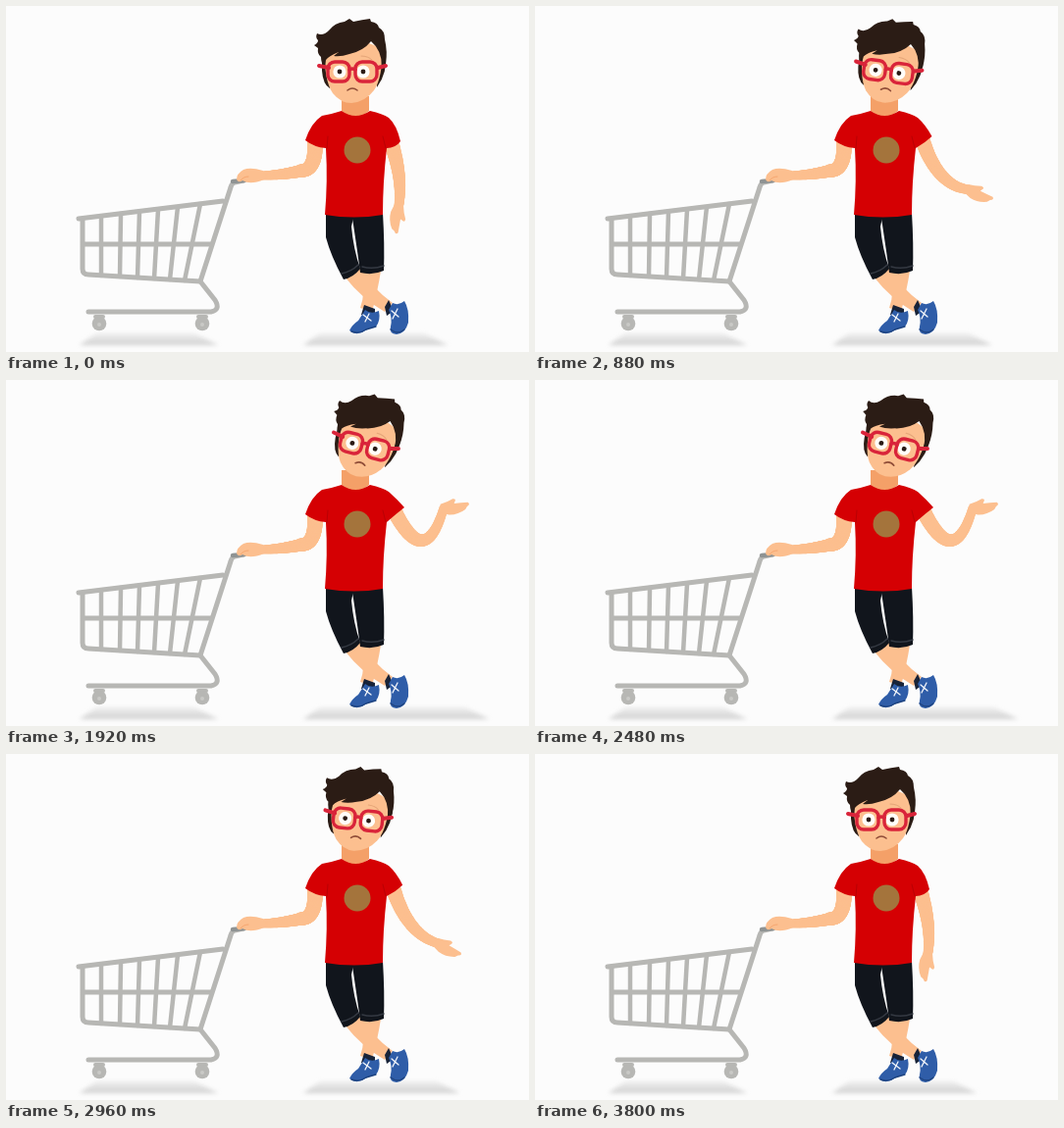
Recreate the animation shown at these times as an HTML page with a canvas. Size 533x353 px, loop 3840 ms.

```html
<!DOCTYPE html>
<html lang="en">
<head>
<meta charset="utf-8">
<title>Shopper with an empty cart</title>
<style>
html, body { margin: 0; width: 100%; height: 100%; overflow: hidden; background: #fcfcfc; }
canvas { display: block; }
</style>
</head>
<body>
<canvas id="stage" width="533" height="353"></canvas>
<script>
const ctx = document.getElementById('stage').getContext('2d');
const LOOP = 3840, STEP = 40, MIRROR = 3810;
const SKIN = '#fcbf8f', SHADE = '#f4a068', RED = '#d50003', HAIR = '#2b1c15';
const GREY = '#b7b7b4', BLACK = '#11151c', BLUE = '#2f5da8', FRAME = '#d9243a';

// time, elbow control x/y, wrist x/y, hand angle, sleeve lift, shadow right edge
const ARM = [
  [560, 405, 176, 400, 206, 100, 0, 452],
  [730, 402, 184, 424, 211, 50, 0.1, 452],
  [865, 409, 183, 442, 191, 28, 0.6, 466],
  [1120, 427, 195, 446, 131, -5, 1, 494]
];

const lerp = (a, b, p) => a + (b - a) * p;
const clamp = p => Math.max(0, Math.min(1, p));

function armPose(t) {
  let i = 0;
  while (i < ARM.length - 2 && t > ARM[i + 1][0]) i++;
  const a = ARM[i], b = ARM[i + 1];
  const p = clamp((t - a[0]) / (b[0] - a[0]));
  return a.slice(1).map((v, k) => lerp(v, b[k + 1], p));
}

function fill(d, color) {
  ctx.fillStyle = color;
  ctx.fill(new Path2D(d));
}

function line(d, color, width) {
  ctx.strokeStyle = color;
  ctx.lineWidth = width;
  ctx.lineCap = ctx.lineJoin = 'round';
  ctx.stroke(new Path2D(d));
}

function dot(x, y, r, color) {
  ctx.fillStyle = color;
  ctx.beginPath();
  ctx.arc(x, y, r, 0, Math.PI * 2);
  ctx.fill();
}

// Tapered limb along a quadratic curve
function limb(x0, y0, cx, cy, x1, y1, r0, r1) {
  for (let i = 0; i <= 80; i++) {
    const p = i / 80;
    dot(lerp(lerp(x0, cx, p), lerp(cx, x1, p), p),
        lerp(lerp(y0, cy, p), lerp(cy, y1, p), p), lerp(r0, r1, p), SKIN);
  }
}

function shadow(left, right) {
  const shade = ctx.createLinearGradient(0, 332, 0, 347);
  shade.addColorStop(0, 'rgba(205,205,205,0.15)');
  shade.addColorStop(1, 'rgba(200,200,200,0.9)');
  ctx.save();
  ctx.filter = 'blur(2px)';
  fill(`M${left + 1} 346 L${left + 18} 334 H${right - 26} L${right - 2} 346 Z`, shade);
  ctx.restore();
}

function cart() {
  line('M74 217 L221 199 M78 217 V268 Q78 274 84 274 L198 281 M78 243 H209', GREY, 5);
  line('M97 215 V275 M117 212 L116 276 M136 210 L134 277 M155 208 L151 278 M175 205 L167 279 M198 202 L182 280', GREY, 4.5);
  line('M242 178 L233 180 Q230 181 229 185 L198 281 L213 300 Q219 310 209 312 H84', GREY, 5);
  line('M231 179 L243 178', '#8f9393', 4.5);
  for (const x of [95, 200]) {
    line(`M${x - 4} 317 H${x + 4}`, GREY, 4);
    dot(x, 324, 7.3, GREY);
    dot(x, 325, 2, '#c9c9c6');
  }
}

function legs() {
  fill('M362 270 L382 270 Q379 290 373 312 L361 308 Q367 292 362 270 Z', SKIN);
  fill('M345 276 L361 267 Q372 287 394 303 L386 312 Q362 298 345 276 Z', SKIN);
  fill('M365 305 L376 309 L376 317 L362 315 Z M390 300 L395 311 L388 316 L386 307 Z', '#182338');
  fill('M366 310 Q372 315 380 311 Q382 321 377 327 Q368 329 363 333 Q355 336 350 331 Q353 325 359 321 Z', BLUE);
  fill('M394 303 Q400 306 406 301 Q411 309 410 323 Q407 334 398 335 Q390 334 392 327 Q394 318 390 310 Z', BLUE);
  line('M352 332 Q360 335 367 330 L377 327 M392 330 Q399 336 406 330', '#1d4380', 1.4);
  line('M364 315 L372 321 M370 314 L366 322 M393 311 L400 317 M399 309 L394 319', '#f2f5fa', 1.3);
  fill('M352 211 H384 Q386 244 385 270 Q374 275 361 272 L358 250 L354 223 Z', BLACK);
  fill('M326 211 H355 L352 225 Q354 248 361 268 Q354 277 344 279 Q331 255 326 236 Z', BLACK);
  line('M342 273 Q352 271 359 264 M363 266 Q374 269 385 265', '#343942', 1.5);
}

function leftArm() {
  limb(315, 138, 316, 169, 300, 168, 8, 6.5);
  limb(302, 168, 279, 173, 258, 173, 6.5, 4);
  fill('M262 168 Q249 164 242 167 Q235 171 235 177 Q237 181 241 178 Q249 183 263 177 Z', SKIN);
  line('M239 178 Q242 174 247 174', SHADE, 0.8);
}

function rightArm([cx, cy, wx, wy, angle, lift]) {
  limb(lerp(392, 396, lift), lerp(138, 134, lift), cx, cy, wx, wy, 7.8, 4.6);
  ctx.save();
  ctx.translate(wx, wy);
  ctx.rotate(angle * Math.PI / 180);
  fill('M-3 -4.6 Q4 -6 10 -9 Q14 -9 12 -6 L11 -4 Q18 -4 25 -4 Q28 -2 24 0 L22 3 Q14 8 5 7 L-3 4.6 Z', SKIN);
  ctx.restore();
}

function shirt(lift) {
  const x = lerp(402, 406, lift), y = lerp(138, 130, lift);
  fill('M342 92 H370 V107 Q356 119 342 107 Z', SHADE);
  fill(`M342 107 Q356 117 371 107 Q384 110 390 114 Q398 121 ${x} ${y} Q397 ${y + 7} 388 145
    Q384 180 384 213 Q355 218 325 213 Q328 178 326 145 Q314 144 305 137 Q311 119 322 112 Q333 110 342 107 Z`, RED);
  line('M327 146 L328 133 M387 145 L384 133', '#b90004', 1);
  dot(358, 147, 13.5, '#a4743c');
}

function head(turn, blink) {
  ctx.save();
  ctx.translate(355 + 4 * turn, 102);
  ctx.rotate(14 * turn * Math.PI / 180);
  ctx.translate(-355, -102);
  fill('M322 48 H330 V84 Q323 80 322 66 Z M377 48 H387 Q389 68 378 83 Z', HAIR);
  fill('M325 45 Q324 76 333 89 Q341 99 352 99 Q366 98 375 86 Q384 73 383 44 Q355 27 325 45 Z', SKIN);
  fill(`M314 40 Q318 38 318 35 Q315 32 317 28 Q323 31 329 25 Q335 17 345 16 L350 13 L354 16
    Q363 14 371 13 L372 16 Q379 17 380 22 Q386 25 386 34 Q389 47 387 58 L383 62
    Q383 45 372 36 Q364 46 350 49 Q341 52 334 51 L339 47 Q329 51 326 55 L325 63 Q321 59 321 52
    Q317 49 318 43 Z`, HAIR);
  line('M362 51 Q369 51 373 55', '#e4a477', 1);
  for (const x of [340, 364]) {
    if (blink) line(`M${x - 5} 68 Q${x} 70 ${x + 5} 68`, '#d98d61', 1);
    else {
      dot(x, 67, 6.6, '#fffdf9');
      dot(x, 67, 2.4, '#2b1b16');
    }
  }
  line('M319 61 L329 63 M379 63 L387 61', FRAME, 4);
  ctx.strokeStyle = FRAME;
  ctx.lineWidth = 3.4;
  for (const x of [328, 356]) {
    ctx.beginPath();
    ctx.roundRect(x, 57, 22, 20, 7);
    ctx.stroke();
  }
  line('M350 65 Q353 63 356 65', FRAME, 3.5);
  line('M348 86 Q353 82 358 86', '#8f4c37', 1.6);
  ctx.restore();
}

function draw(now) {
  const time = Math.floor((now % LOOP) / STEP) * STEP;
  const t = Math.min(time, MIRROR - time);
  const arm = armPose(t);
  ctx.fillStyle = '#fcfcfc';
  ctx.fillRect(0, 0, 533, 353);
  shadow(74, 218);
  shadow(302, arm[6]);
  cart();
  legs();
  leftArm();
  rightArm(arm);
  shirt(arm[5]);
  head(clamp((t - 730) / 270), t >= 690 && t <= 770);
}

const start = performance.now();
function tick() {
  draw(performance.now() - start);
  requestAnimationFrame(tick);
}
tick();
</script>
</body>
</html>
```
